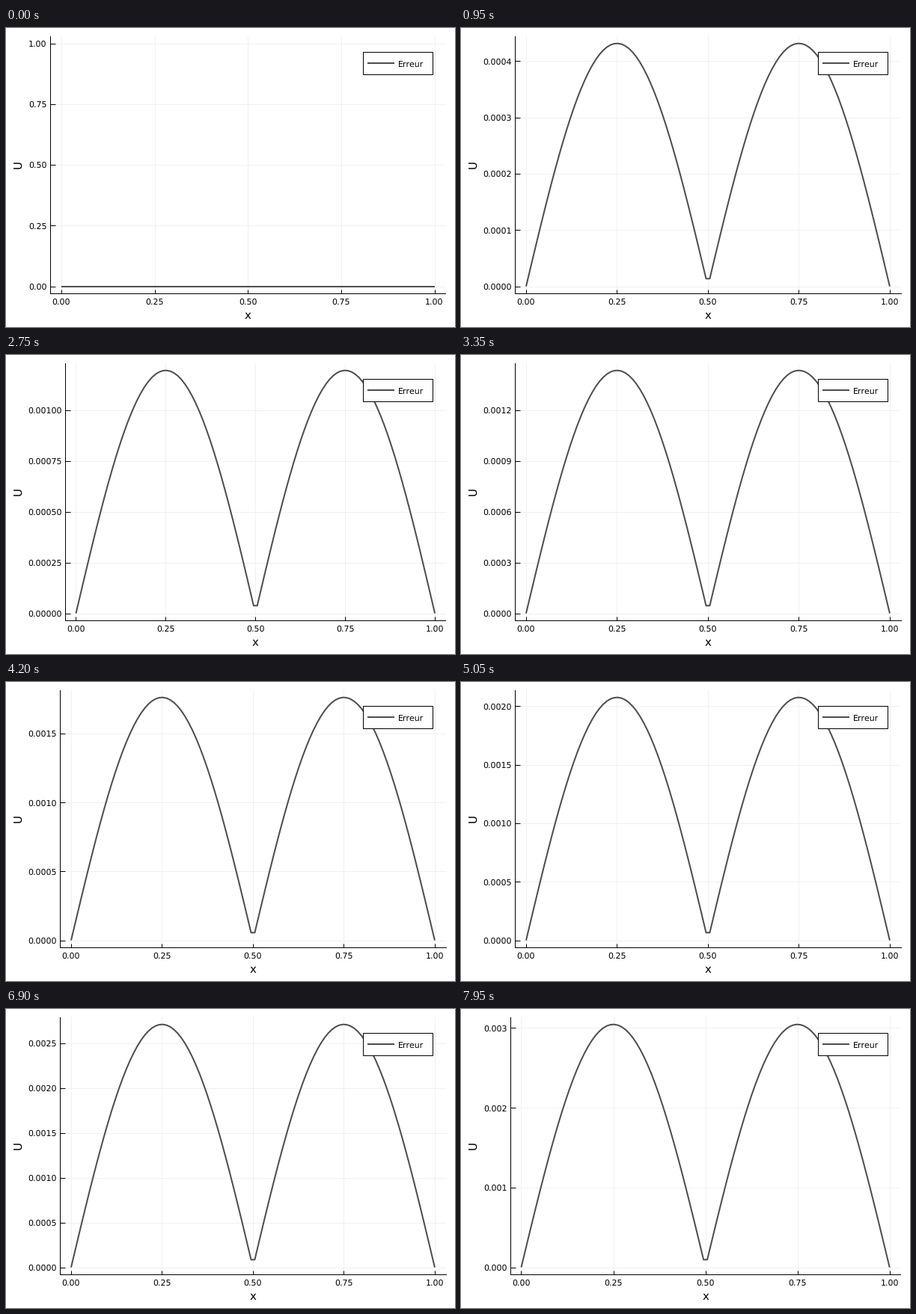
Animation of 600 by 400 pixels, one loop 8000 ms. Source, as a matplotlib script:

```python
import math

import matplotlib.pyplot as plt
import numpy as np
from matplotlib.animation import FuncAnimation
from matplotlib.patches import Rectangle

W, H, DPI = 600, 400, 100
FRAMES, INTERVAL = 160, 50
RIGHT, TOP, BOTTOM = 587.5, 10.9, 355.4
MARGIN = 0.03
GREY = "#4d4d4d"
NICE = [(1, 1.0), (5, 0.9), (2, 0.7), (2.5, 0.5), (3, 0.2)]


def pt(px):
    return px * 72 / DPI


plt.rcParams.update({
    "font.family": "DejaVu Sans",
    "mathtext.fontset": "dejavusans",
    "text.hinting": "none",
    "text.hinting_factor": 1,
})
SMALL, LARGE = pt(10.8), pt(15.1)

x = np.linspace(0, 1, 100)
shape = np.abs(np.sin(2 * np.pi * x))
shape /= shape.max()


def peak(n):
    """Largest error after n time steps."""
    return 2.3225e-5 * n * math.exp(-0.001213 * n)


def pick_ticks(top):
    """Choose 4 to 6 round ticks from zero: (step mantissa, exponent, count)."""
    view, span = top * (1 + MARGIN), top * (1 + 2 * MARGIN)
    order = math.floor(math.log10(top))
    best, best_score = None, -1
    for count in (4, 5, 6):
        for z in (order, order - 1):
            for q, nice in NICE:
                step = q * 10.0 ** z
                if math.floor(view / step) + 1 != count:
                    continue
                grain = 1 - abs(count - 5) / 5
                cover = 1.5 * span / (step * (count - 1))
                score = grain / 4 + cover / 3 + nice / 4
                if score > best_score + 1e-9:
                    best, best_score = (q, z, count), score
    return best


def scientific(v):
    if v == 0:
        return "0"
    e = math.floor(math.log10(v) + 1e-9)
    return rf"${v / 10.0 ** e:.1f}{{\times}}10^{{{e}}}$"


def y_axis(top):
    """Tick values, their labels and the left edge of the plot."""
    q, z, count = pick_ticks(top)
    values = [i * q * 10.0 ** z for i in range(count)]
    if values[-1] < 0.99e-4:
        return values, [scientific(v) for v in values], 86
    digits = -z + (q == 2.5)
    labels = [f"{v:.{digits}f}" for v in values]
    return values, labels, 59.0 + 6.7 * (len(labels[0]) - 4)


fig = plt.figure(figsize=(W / DPI, H / DPI), dpi=DPI, facecolor="white")
ax = fig.add_axes([0.1, 0.1, 0.8, 0.8])
ax.set_xlim(-MARGIN, 1 + MARGIN)
ax.set_xticks([0, 0.25, 0.5, 0.75, 1], ["0.00", "0.25", "0.50", "0.75", "1.00"])
ax.spines[["top", "right"]].set_visible(False)
ax.spines[["left", "bottom"]].set_linewidth(pt(1))
ax.set_axisbelow(True)
ax.grid(color="#f0f0f0", linewidth=pt(1))
ax.tick_params(direction="in", width=pt(1), labelsize=SMALL)
ax.tick_params(axis="x", length=pt(5), pad=pt(5.8))
ax.tick_params(axis="y", length=pt(6.8), pad=pt(4.4))
curve, = ax.plot(x, 0 * x, color=GREY, linewidth=pt(2), solid_joinstyle="round",
                 solid_capstyle="butt")

# Overlay in pixel coordinates for the legend and axis names
over = fig.add_axes([0, 0, 1, 1], zorder=5)
over.set_xlim(0, W)
over.set_ylim(H, 0)
over.axis("off")
over.add_patch(Rectangle((477, 32), 93, 30, facecolor="white",
                         edgecolor="black", linewidth=pt(1)))
over.plot([483, 519], [47, 47], color=GREY, linewidth=pt(2),
          solid_capstyle="butt")
over.text(524.3, 52, "Erreur", fontsize=SMALL, va="baseline")
over.text(24.7, 182.6, "U", fontsize=LARGE, rotation=90, ha="right", va="center")
x_name = over.text(0, 389, "x", fontsize=LARGE, ha="center", va="baseline")


def draw(n):
    top = peak(n)
    scale = top or 1
    values, labels, left = y_axis(scale)
    ax.set_position([left / W, 1 - BOTTOM / H, (RIGHT - left) / W, (BOTTOM - TOP) / H])
    ax.set_ylim(-MARGIN * scale, (1 + MARGIN) * scale)
    ax.set_yticks(values, labels)
    curve.set_ydata(top * shape)
    x_name.set_x((left + RIGHT) / 2)
    return curve, x_name


anim = FuncAnimation(fig, draw, frames=FRAMES, interval=INTERVAL,
                     init_func=lambda: draw(0), repeat=True, repeat_delay=0)
plt.show()
```
